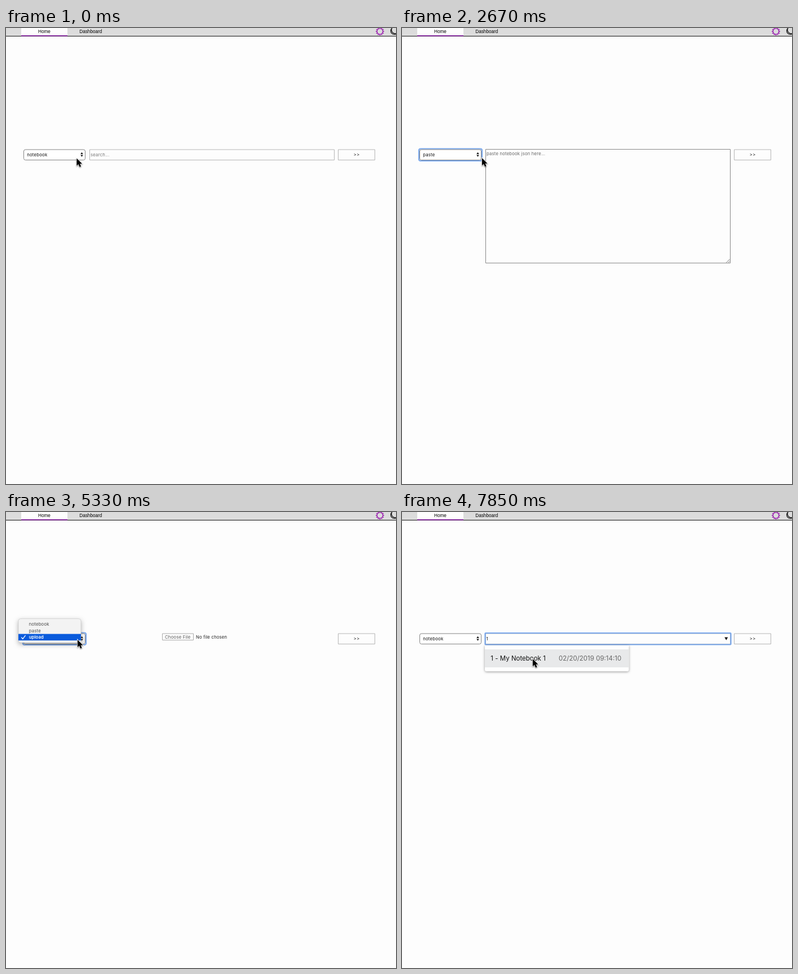
An HTML page with a canvas for the animation above (8000 ms loop, 692 by 810 pixels).

```html
<!DOCTYPE html>
<html lang="en">
<head>
<meta charset="utf-8">
<title>Notebook search</title>
<style>
html, body { margin: 0; width: 100%; height: 100%; overflow: hidden; background: #fdfdfd; }
canvas { display: block; }
</style>
</head>
<body>
<canvas id="stage" width="692" height="810"></canvas>
<script>
const ctx = document.getElementById('stage').getContext('2d');
const LOOP = 8000;
const OPTIONS = ['notebook', 'paste', 'upload'];
const UI = '7.7px Inter, sans-serif';
const ROW = 11.6;

// [start ms, pointer x, pointer y, changes to the page]
const STEPS = [
  [0, 125.5, 231.5, { mode: 0, focus: 'none', menu: 0, hover: 0, value: '', list: 0, beam: false }],
  [140, 121, 227],
  [740, 121, 227, { focus: 'select', menu: 1 }],
  [1040, 121, 231, { hover: 1 }],
  [1630, 121, 231, { menu: .03 }],
  [1780, 128, 232, { mode: 1, menu: 0 }],
  [1920, 148, 233],
  [2070, 161.5, 233],
  [2520, 156, 232],
  [2670, 142, 231],
  [2810, 125, 230],
  [2960, 117.5, 230],
  [3250, 118.5, 231, { menu: 1, hover: 2 }],
  [3700, 118.5, 232],
  [4150, 118.5, 232, { menu: .03 }],
  [4300, 122, 232, { mode: 2, menu: 0 }],
  [4440, 142, 233],
  [4590, 158, 233],
  [4740, 158, 233],
  [4880, 152, 231],
  [5030, 138, 228],
  [5180, 127, 227],
  [5330, 127, 227, { menu: 1 }],
  [5480, 127, 226.5],
  [5770, 111, 214, { hover: 1 }],
  [5920, 93.5, 203, { hover: 0 }],
  [6520, 93.5, 203, { menu: .03 }],
  [6670, 98, 205, { mode: 0, menu: 0 }],
  [6820, 124, 214],
  [6960, 168, 225, { beam: true }],
  [7110, 198, 230],
  [7260, 198, 230, { focus: 'input' }],
  [7400, 198, 230, { value: '1' }],
  [7560, 198, 230, { list: 1 }],
  [7700, 219, 251, { list: 2, beam: false }],
  [7850, 232, 261]
];

function stateAt(t) {
  const s = {};
  for (const [start, x, y, change] of STEPS) {
    if (start > t) break;
    Object.assign(s, { x, y }, change);
  }
  return s;
}

function text(str, x, y, color = '#111', font = UI, spacing = .25) {
  ctx.font = font;
  ctx.letterSpacing = spacing + 'px';
  ctx.fillStyle = color;
  ctx.fillText(str, x, y);
}

function fill(x, y, w, h, color) {
  ctx.fillStyle = color;
  ctx.fillRect(x, y, w, h);
}

function box(x, y, w, h, radius, color, border, width = 1) {
  ctx.beginPath();
  ctx.roundRect(x, y, w, h, radius);
  if (color) { ctx.fillStyle = color; ctx.fill(); }
  if (border) { ctx.strokeStyle = border; ctx.lineWidth = width; ctx.stroke(); }
}

function shape(d, x, y, color, border, width = 1) {
  const path = new Path2D(d);
  ctx.save();
  ctx.translate(x, y);
  if (border) { ctx.strokeStyle = border; ctx.lineWidth = width; ctx.stroke(path); }
  if (color) { ctx.fillStyle = color; ctx.fill(path); }
  ctx.restore();
}

function shadow(blur, dy, alpha) {
  ctx.shadowColor = `rgba(0,0,0,${alpha})`;
  ctx.shadowBlur = blur;
  ctx.shadowOffsetY = dy;
}

function header() {
  fill(0, 0, 692, 14, '#dcdcdc');
  fill(27, 0, 82, 13, '#fdfdfd');
  fill(0, 14, 692, 1, '#111');
  fill(27, 13, 82, 1.6, '#8e24aa');
  const tab = '8.2px "Liberation Sans", Arial, sans-serif';
  text('Home', 57, 8.5, '#000', tab, 0);
  text('Dashboard', 130.3, 8.5, '#000', tab, 0);

  ctx.beginPath();
  ctx.arc(663.5, 6, 5.2, 0, 7);
  for (let i = 0; i < 12; i++) {
    const a = i * Math.PI / 6, c = Math.cos(a), s = Math.sin(a);
    ctx.moveTo(663.5 + 5.2 * c, 6 + 5.2 * s);
    ctx.lineTo(663.5 + 7.5 * c, 6 + 7.5 * s);
  }
  ctx.strokeStyle = '#9c27b0';
  ctx.lineWidth = 1.5;
  ctx.stroke();
  shape('M4-6A6.4 6.4 0 1 0 13 3A6.6 6.6 0 0 1 4-6Z', 681, 6, null, '#222', 1.4);
}

function select(s) {
  const focused = s.focus === 'select';
  if (focused) box(30, 214.5, 112, 21.5, 3, null, '#79a7ec', 2.2);
  let paint = '#fff';
  if (s.menu) {
    paint = ctx.createLinearGradient(0, 216, 0, 235);
    paint.addColorStop(0, '#fff');
    paint.addColorStop(1, '#ececec');
  }
  box(31.5, 216, 109, 18.5, 3, paint, '#777', .9);
  text(OPTIONS[s.mode], 37.2, 228);
  shape('M0 0L2.3-3.2L4.6 0ZM0 1.6L2.3 4.8L4.6 1.6Z', 132.2, 224, '#111');
}

function field(s) {
  if (s.mode === 2) {
    box(277.5, 216, 55, 11.5, 0, '#fdfdfd', '#aaa');
    text('Choose File', 282, 224.5, '#555');
    text('No file chosen', 337, 224.5, '#222', UI, .2);
    return;
  }
  if (s.mode === 1) {
    box(148.5, 215.5, 434, 202, 0, '#fdfdfd', '#888');
    text('paste notebook json here...', 150, 225.5, '#666', UI, .2);
    shape('M0 6L6 0M3.4 6L6 3.4', 575.5, 410.7, null, '#555', .8);
    return;
  }
  const focused = s.focus === 'input';
  box(148.5, 216, 434, 18.5, 0, '#fdfdfd', '#b5b5b5');
  if (focused) {
    box(147.5, 215, 436, 20.5, 1, null, '#79a7ec', 2.2);
    shape('M0 0H6L3 5.2Z', 572.3, 222.5, '#111');
    if (!s.value) fill(149.5, 219, .8, 12, '#222');
  }
  if (s.value) text(s.value, 149.5, 228);
  else text('search...', 150, 228, '#777');
}

function suggestions(hovered) {
  ctx.save();
  shadow(4, 1, .4);
  box(147, 237, 255.5, 46, [0, 0, 3, 3], '#fff');
  ctx.restore();
  if (hovered) fill(147, 244, 255.5, 32, '#e8e9ea');
  const font = '11.5px Inter, sans-serif';
  text('1 - My Notebook 1', 157.3, 264, '#111', font, 0);
  text('02/20/2019 09:14:10', 278, 264, '#666', font, 0);
}

function menu(s) {
  const top = 212.8 - s.mode * ROW;
  ctx.save();
  ctx.globalAlpha = s.menu;
  ctx.save();
  shadow(9, 3, .32);
  box(22, top, 111, 42.5, 4, '#f3f3f3');
  ctx.restore();
  box(22, top, 111, 42.5, 4, null, '#c4c4c4', .6);
  OPTIONS.forEach((name, i) => {
    const y = top + 3.8 + i * ROW, on = i === s.hover;
    if (on) fill(22, y, 111, ROW, '#0a5bdc');
    text(name, 40.8, y + 8.7, on ? '#fff' : '#4a4a4a', on ? '600 ' + UI : UI, on ? .1 : .2);
    if (i === s.mode) shape('M0 3.4L2.5 6.3L7.2 0', 27.3, y + 2.5, null, on ? '#fff' : '#444', 1.3);
  });
  ctx.restore();
}

function pointer(s) {
  if (s.beam) {
    shape('M-3-6Q0-6 0-4Q0-6 3-6M0-4V5M-3 7Q0 7 0 5Q0 7 3 7M-1.6 2H1.6', s.x, s.y, null, '#222', 1.2);
    return;
  }
  ctx.save();
  shadow(2, 1, .35);
  shape('M0 0V13L3 10.3L5.2 15.2L7.6 14.2L5.4 9.4H9.5Z', s.x, s.y, '#000', '#fff', 1.6);
  ctx.restore();
}

function draw(now) {
  const s = stateAt(now % LOOP);
  fill(0, 0, 692, 810, '#fdfdfd');
  header();
  select(s);
  field(s);
  box(589.5, 216, 65, 18.5, 0, '#fdfdfd', '#b5b5b5');
  text('>>', 616.8, 228, '#222', UI, .4);
  if (s.list) suggestions(s.list === 2);
  if (s.menu) menu(s);
  pointer(s);
  requestAnimationFrame(draw);
}
requestAnimationFrame(draw);
</script>
</body>
</html>
```
